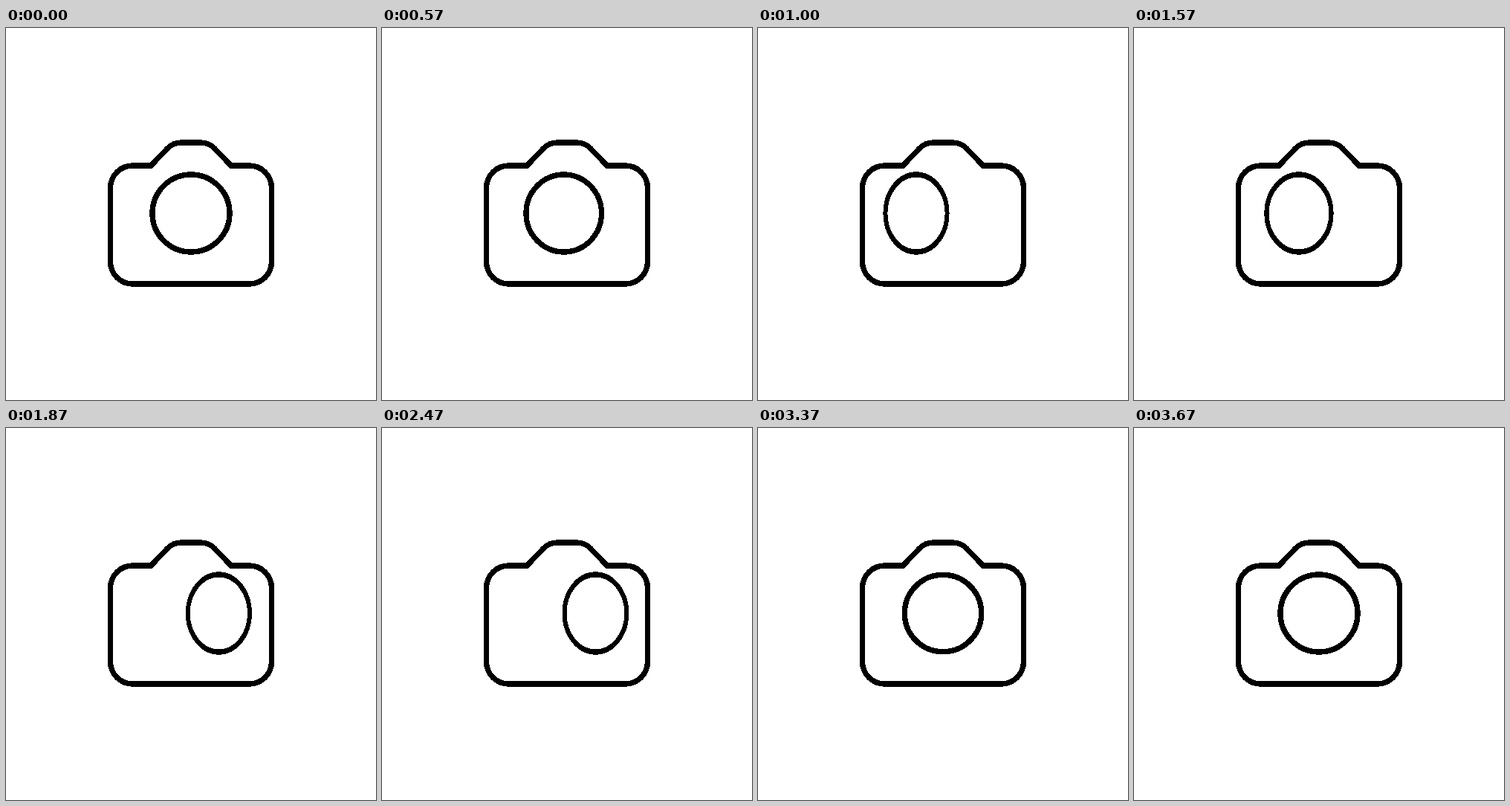
An HTML page for the animation above (4.06 s loop, 498x500 px).

```html
<!DOCTYPE html>
<html lang="en">
<head>
<meta charset="utf-8">
<title>Camera</title>
<style>
  html, body { margin: 0; width: 100%; height: 100%; overflow: hidden; background: #fff; }
  svg { display: block; width: 100%; height: 100%; }
</style>
</head>
<body>
<svg viewBox="0 0 498 500" fill="none" stroke="#000" stroke-width="7.4" shape-rendering="crispEdges">
  <path d="M195 185 L217.3 161.9 A26 26 0 0 1 236 154 H262 A26 26 0 0 1 280.7 161.9 L303 185
           H327.5 A30 30 0 0 1 357.5 215 V314 A30 30 0 0 1 327.5 344
           H170.5 A30 30 0 0 1 140.5 314 V215 A30 30 0 0 1 170.5 185 Z"/>
  <circle id="lens" r="52"/>
</svg>
<script>
  const LOOP = 4060, FPS = 30, CENTER = 249;
  const LEFT = -36, RIGHT = 39.5, NARROW = 0.8;
  const lens = document.getElementById('lens');

  // [tick, value] pairs; equal neighbours are holds
  const slide = [[0, 0], [10, 0], [30, LEFT], [40, LEFT], [60, RIGHT], [70, RIGHT], [90, 0], [122, 0]];
  const turn = [[0, 1], [10, 1], [30, NARROW], [45, NARROW], [50, 1], [55, NARROW], [70, NARROW], [90, 1], [122, 1]];
  const press = [[0, 1], [100, 1], [105, 0.8], [110, 1], [122, 1]];

  // cubic-bezier(a, 0, 1 - a, 1), solved by bisection
  function ease(x, a = 0.8) {
    let lo = 0, hi = 1;
    for (let i = 0; i < 30; i++) {
      const s = (lo + hi) / 2, r = 1 - s;
      if (3 * r * r * s * a + 3 * r * s * s * (1 - a) + s ** 3 < x) lo = s;
      else hi = s;
    }
    return lo * lo * (3 - 2 * lo);
  }

  function valueAt(keys, tick) {
    const i = keys.findIndex(([end], n) => n > 0 && tick <= end);
    const [t0, v0] = keys[i - 1], [t1, v1] = keys[i];
    return v0 === v1 ? v0 : v0 + (v1 - v0) * ease((tick - t0) / (t1 - t0));
  }

  function draw(ms) {
    const tick = Math.floor((ms % LOOP + 3.5) * FPS / 1000);
    const x = CENTER + valueAt(slide, tick);
    const size = valueAt(press, tick);
    const width = size * valueAt(turn, tick);
    lens.setAttribute('transform', `translate(${x} ${CENTER}) scale(${width} ${size})`);
  }

  const start = performance.now();
  function loop() {
    draw(performance.now() - start);
    requestAnimationFrame(loop);
  }
  loop();
</script>
</body>
</html>
```
